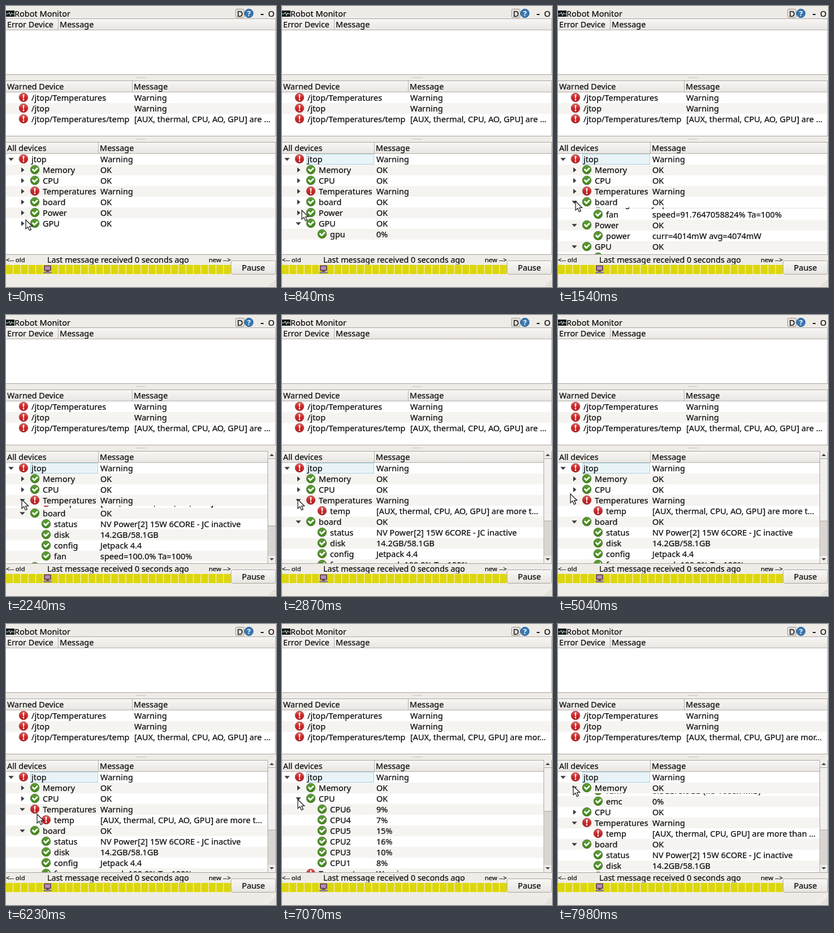
Animation, 478 px wide and 498 px high, one loop 8 s. Source, as an HTML page:

```html
<!DOCTYPE html>
<html lang="en">
<head>
<meta charset="utf-8">
<title>Robot Monitor</title>
<style>
  html, body { margin: 0; width: 100%; height: 100%; overflow: hidden; background: #efece8; }
  svg { display: block; }
  text {
    font: 14.5px "Noto Sans", "Open Sans", sans-serif; white-space: pre;
    fill: #0c0c0c; stroke: #0c0c0c; stroke-width: .22px;
  }
  .label { font-size: 14.3px; }
  .small { font-size: 11.4px; }
</style>
</head>
<body>
<svg id="stage" width="478" height="498" viewBox="0 0 478 498">
  <defs>
    <linearGradient id="head" x2="0" y2="1">
      <stop stop-color="#f9f7f5"/><stop offset="1" stop-color="#e8e5e1"/>
    </linearGradient>
    <linearGradient id="red" x2="0" y2="1">
      <stop stop-color="#e0605c"/><stop offset=".5" stop-color="#c9282a"/><stop offset="1" stop-color="#b41c20"/>
    </linearGradient>
    <linearGradient id="green" x2="0" y2="1">
      <stop stop-color="#5f9e38"/><stop offset="1" stop-color="#3f8415"/>
    </linearGradient>
    <g id="warn">
      <circle r="7.8" fill="url(#red)" stroke="#a04a48" stroke-width=".8"/>
      <path d="M-1.4 -5.2H1.4L.8 1.4H-.8Z" fill="#fff"/><circle cy="4" r="1.4" fill="#fff"/>
    </g>
    <g id="ok">
      <circle r="7.8" fill="url(#green)" stroke="#4a6f38" stroke-width=".8"/>
      <path d="M-4.2 -1L-.8 2.8L5 -3" fill="none" stroke="#fff" stroke-width="2.8"/>
    </g>
    <path id="closed" d="M-2.5 -4.5L3 0L-2.5 4.5Z" fill="#3d3d3d"/>
    <path id="open" d="M-4.7 -2.2H4.7L0 3Z" fill="#3d3d3d"/>
  </defs>
  <g id="chrome"></g>
  <g id="live"></g>
  <path id="cursor" d="M0 0V16L3.8 12.6L6.4 18.8L9.4 17.5L6.8 11.5H11.6Z" fill="#f4f4f4" stroke="#1c1c1c" stroke-width="1.2"/>
</svg>
<script>
const LOOP = 8000, TICK = 70, ROW = 19, TOP = 262, VIEW = 178, PAGE = 9, SLIDE = 197;
const EDGE = '#aaa59e';
const $ = id => document.getElementById(id);

const rect = (x, y, w, h, fill, extra = '') =>
  `<rect x="${x}" y="${y}" width="${w}" height="${h}" fill="${fill}" ${extra}/>`;
const text = (x, y, s, extra = '') =>
  `<text x="${x}" y="${y}" ${extra}>${s.replace(/</g, '&lt;').replace(/>/g, '&gt;')}</text>`;
const use = (id, x, y) => `<use href="#${id}" x="${x}" y="${y}"/>`;
const clip = (x, y, w, h, body) => `<svg x="${x}" y="${y}" width="${w}" height="${h}">${body}</svg>`;
const at = (track, t) => track.filter(k => k[0] <= t).pop();

// Tree: depth, name, message (a string or a function of time)
const tree = [
  [0, 'jtop', 'Warning'],
  [1, 'Memory', 'OK'],
  [2, 'iram', '0.0kB/252.0kB (lfb 252kB)'],
  [2, 'swap', '0.0GB/4.0GB (cached 0MB)'],
  [2, 'ram', '6.8GB/8.0GB (lfb 1068x4MB)'],
  [2, 'emc', '0%'],
  [1, 'CPU', 'OK'],
  ...[[6, 9, 9], [4, 10, 7], [5, 12, 15], [2, 14, 16], [3, 9, 10], [1, 11, 8]]
    .map(([n, a, b]) => [2, 'CPU' + n, t => (t < 7000 ? a : b) + '%']),
  [1, 'Temperatures', 'Warning'],
  [2, 'temp', t => t < 6510 ? '[AUX, thermal, CPU, AO, GPU] are more t…' : '[AUX, thermal, CPU, GPU] are more than …'],
  [1, 'board', 'OK'],
  [2, 'status', 'NV Power[2] 15W 6CORE - JC inactive'],
  [2, 'disk', '14.2GB/58.1GB'],
  [2, 'config', 'Jetpack 4.4'],
  [2, 'fan', t => `speed=${t < 2000 ? '91.7647058824' : '100.0'}% Ta=100%`],
  [1, 'Power', 'OK'],
  [2, 'power', t => `curr=${t < 2400 ? 4014 : t < 4060 ? 4054 : 3973}mW avg=4074mW`],
  [1, 'GPU', 'OK'],
  [2, 'gpu', '0%']
];
const warned = ['jtop', 'Temperatures', 'temp'];

// Time, branch, opens (1) or closes (0)
const toggles = [
  [90, 'GPU', 1], [840, 'Power', 1], [1483, 'board', 1], [2200, 'Temperatures', 1],
  [6650, 'CPU', 1], [7440, 'CPU', 0], [7918, 'Memory', 1]
];
const scrolls = [[0, 0], [2940, 1], [3010, 2], [3080, 3], [3150, 4], [3430, 3], [3570, 2], [4340, 1], [4760, 0]];
const pointer = [
  [0, 35, 379], [560, 36, 374], [630, 36, 368], [700, 35, 362],
  [1190, 37, 360], [1260, 42, 356], [1330, 45, 354], [1400, 31, 346],
  [1820, 31, 340], [1890, 30, 333], [1960, 28, 327],
  [5040, 22, 317], [5180, 35, 318], [5320, 43, 325], [5740, 30, 318], [5810, 31, 322],
  [5950, 44, 331], [6090, 50, 334], [6230, 55, 337],
  [6370, 48, 330], [6440, 39, 320], [6510, 32, 314], [6580, 28, 311], [7280, 34, 309],
  [7490, 31, 304], [7560, 29, 297], [7630, 28, 291], [7700, 27, 287]
];

// How far a branch is open, from 0 to 1
function openness(name, t) {
  const k = at(toggles.filter(e => e[1] === name), t);
  if (!k) return 0;
  const p = Math.min(1, (t - k[0]) / SLIDE);
  return k[2] ? p : 1 - p;
}

function header(y, split, title, right = 478) {
  return rect(0, y, right, 21, 'url(#head)') +
    rect(0, y, right, 1, EDGE) + rect(0, y + 20, right, 1, '#b5b1ab') +
    rect(split, y + 1, 1, 19, '#b5b1ab') +
    text(2, y + 16, title, 'class="label"') + text(split + 3, y + 16, 'Message');
}

function row(y, index, depth, name, message, messageX, arrow) {
  const x = 31 + 20 * depth, mid = y + 9.5;
  return rect(0, y, 478, ROW, index % 2 ? '#f6f4f1' : '#fff') +
    (arrow ? use(arrow, x - 22 + (arrow === 'closed' ? .5 : 0), mid) : '') +
    use(warned.some(w => name.endsWith(w)) ? 'warn' : 'ok', x, mid - .5) +
    text(x + 14, y + 14.5, name) + text(messageX, y + 14.5, message);
}

function dots(y) {
  return [0, 1, 2, 3, 4, 5].map(i => rect(231 + i * 3, y, 1.3, 1.3, '#aaa6a0')).join('');
}

function table(y, h, split, title) {
  return rect(0, y, 478, h, '#fff') + header(y, split, title) +
    rect(0, y + h - 1, 478, 1, EDGE) + rect(477, y, 1, h, EDGE) + dots(y + h + 4);
}

function drawChrome() {
  let s = rect(0, 0, 478, 498, '#efece8');
  // title bar
  s += rect(0, 8, 15, 11, '#151b1b') +
    '<path d="M0 14H4L6 11L8 17L10 12L11 14H15" fill="none" stroke="#cfe0dc"/>' + text(15, 19, 'Robot Monitor') +
    rect(406.5, 5.5, 15, 15, '#e3e0dc', 'rx="2" stroke="#9d9993"') + text(409, 18.5, 'D') +
    '<circle cx="430" cy="13" r="7.6" fill="#3678b5" stroke="#275d90"/>' +
    text(430, 18, '?', 'text-anchor="middle" style="fill:#fff;stroke:none;font-weight:700;font-size:13px"') +
    rect(451, 14, 5, 2, '#161616') + text(464, 19, 'O');
  s += table(22, 100, 92, 'Error Device') + table(132, 99, 223, 'Warned Device');
  // timeline
  s += text(0, 454, '<-- old', 'class="small"') +
    text(198.5, 455, 'Last message received 0 seconds ago', 'text-anchor="middle" class="label"') +
    text(398, 454, 'new -->', 'text-anchor="end" class="small"');
  s += rect(0, 458, 399, 18, '#f1eecb');
  for (let i = 0; i < 30; i++) s += rect(i * 13.3, 459, 12, 16, '#dcd60c');
  s += rect(67, 459.5, 13, 10, '#6d4a62', 'rx="1"') + rect(69, 461.5, 9, 6, '#b58fae') +
    rect(66, 471, 15, 3, '#8e8490') + rect(71, 469, 5, 2, '#57434f');
  // button and size grip
  s += rect(398.5, 451.5, 79, 24, 'url(#head)', `rx="3" stroke="${EDGE}"`) +
    text(438, 469, 'Pause', 'text-anchor="middle"');
  for (let i = 0; i < 4; i++)
    for (let j = 0; j <= i; j++) s += rect(475 - j * 3, 486 + i * 3, 1.3, 1.3, '#b5b1ab');
  $('chrome').innerHTML = s;
}

function drawWarnings(t) {
  const detail = t < 6510 ? '[AUX, thermal, CPU, AO, GPU] are …' : '[AUX, thermal, CPU, GPU] are mor…';
  const rows = [['/jtop/Temperatures', 'Warning'], ['/jtop', 'Warning'], ['/jtop/Temperatures/temp', detail]];
  return clip(0, 153, 477, 77,
    rows.map(([name, message], i) => row(i * ROW, i, 0, name, message, 227)).join(''));
}

// Rows of the tree; a moving branch slides out from under its parent
function drawTree(t) {
  let s = '', y = 0, index = 0, count = 0;
  const put = (node, py, arrow) => row(py, index++, node[0], node[1],
    typeof node[2] === 'function' ? node[2](t) : node[2], 167, arrow);
  for (let i = 0; i < tree.length;) {
    const node = tree[i++], children = [];
    while (node[0] === 1 && i < tree.length && tree[i][0] === 2) children.push(tree[i++]);
    const p = node[0] ? openness(node[1], t) : 1;
    s += put(node, y, p > 0 ? 'open' : 'closed');
    if (!node[0] && t >= 140) {
      s += rect(43.5, .5, 119, 18, '#e9f4f8', 'stroke="#a9d3e2"') + text(45, 14.5, node[1]);
    }
    y += ROW;
    count++;
    if (p > 0) {
      const full = children.length * ROW, shown = Math.round(full * p);
      const body = children.map((c, n) => put(c, n * ROW - full + shown)).join('');
      if (shown) s += clip(0, y, 478, shown, body);
      y += shown;
      if (p === 1) count += children.length;
    }
  }
  return { s, count };
}

function drawScrollbar(count, scroll) {
  const unit = 172 / count;
  const arrow = (y, dir) =>
    `<path d="M466.5 ${y + 2 * dir}H474.5L470.5 ${y - 2 * dir}Z" fill="#45423f"/>`;
  return rect(463, 241, 15, 200, '#d9d6d2') + rect(463, 241, 1, 200, '#b5b1ab') +
    rect(464, 241, 14, 14, '#f0eeec') + rect(464, 427, 14, 14, '#f0eeec') +
    arrow(248, 1) + arrow(433, -1) +
    rect(463.5, 254.5 + scroll * unit, 14, PAGE * unit, '#f2f0ee', `rx="1.5" stroke="${EDGE}"`);
}

let shownTick = -1;
function draw(t) {
  const { s, count } = drawTree(t), bar = count > PAGE, right = bar ? 463 : 478;
  const scroll = at(scrolls, t)[1], [, x, y] = at(pointer, t);
  $('live').innerHTML = drawWarnings(t) + header(241, 163, 'All devices', right) +
    rect(0, TOP, 478, VIEW, '#fff') +
    clip(0, TOP, right, VIEW, `<g transform="translate(0 ${-scroll * ROW})">${s}</g>`) +
    (bar ? drawScrollbar(count, scroll) : '') +
    rect(477, 241, 1, 200, EDGE) + rect(0, 440, 478, 1, EDGE);
  $('cursor').setAttribute('transform', `translate(${x} ${y})`);
}

function frame(now) {
  const elapsed = Math.max(0, now - start) % LOOP;
  const t = Math.floor(elapsed / TICK) * TICK;
  if (t !== shownTick) draw(shownTick = t);
  requestAnimationFrame(frame);
}

drawChrome();
const start = performance.now();
frame(start);
</script>
</body>
</html>
```
